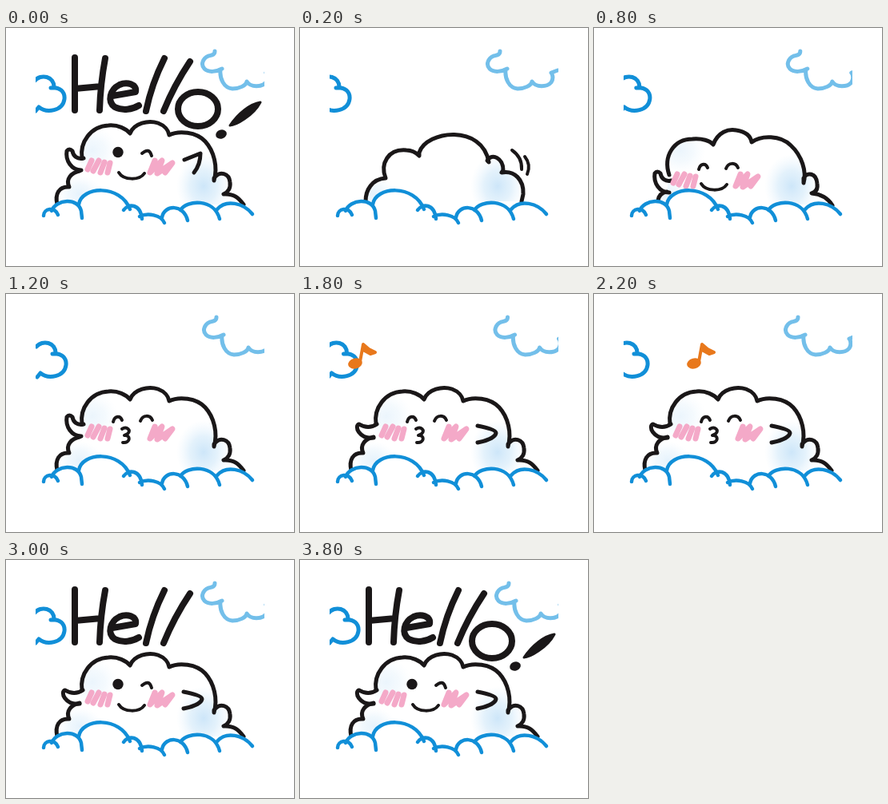
These frames come from a looping animation (360 by 298 pixels, 4 s). An HTML page:

```html
<!DOCTYPE html>
<html lang="en">
<head>
<meta charset="utf-8">
<title>Hello cloud</title>
<style>
html, body { margin: 0; width: 100%; height: 100%; overflow: hidden; background: #fff; }
svg { display: block; width: 360px; height: 298px; }
path { fill: none; stroke: #1a1718; stroke-width: 5; stroke-linecap: round; stroke-linejoin: round; }
path.fill { stroke: none; fill: #fff; }
path.thin { stroke-width: 4; }
.cheeks path { stroke: #f4a9c8; stroke-width: 7; }
.blue path { stroke: #118fd8; }
#front path { fill: #fff; stroke-width: 4.5; }
#sky path { stroke: #73bfea; }
#word path { stroke-width: 8; }
#word .solid { fill: #1a1718; stroke-width: 3; }
#note { fill: #e8781c; }
#note path { stroke: #e8781c; stroke-width: 4; fill: #e8781c; }
</style>
</head>
<body>
<svg viewBox="0 0 360 298" role="img" aria-label="Hello!">
  <defs>
    <clipPath id="frame"><rect x="37" y="26" width="286" height="224"/></clipPath>
    <clipPath id="inside"><path id="bodyClip"/></clipPath>
    <radialGradient id="shade">
      <stop offset="0" stop-color="#cde6f9"/>
      <stop offset=".5" stop-color="#d8ecfa" stop-opacity=".7"/>
      <stop offset="1" stop-color="#e8f4fd" stop-opacity="0"/>
    </radialGradient>
  </defs>

  <g clip-path="url(#frame)">
    <g id="left" class="blue"><path d="M25 66C32 57 50 60 49 75M45 75C56 73 63 80 62 89C60 104 40 107 30 99L26 104"/></g>
    <g id="sky"><path d="M250 29C250 34 246 34 242 35C235 38 232 46 237 51C242 56 252 55 259 51M257 53C256 63 261 75 272 76C281 76 289 72 290 67C295 75 309 74 314 68C317 64 316 58 314 56L322 53"/></g>
  </g>

  <g id="body">
    <path id="bodyFill" class="fill"/>
    <g clip-path="url(#inside)" fill="url(#shade)">
      <ellipse cx="247" cy="198" rx="34" ry="40"/>
      <ellipse id="sideShade" cx="108" cy="153" rx="32" ry="30" opacity=".4"/>
      <ellipse cx="92" cy="208" rx="28" ry="24" opacity=".5"/>
    </g>
    <path id="outline"/>
    <g id="ticks"><path class="thin" d="M265 153Q278 162 277 177M281 161Q289 171 284 183"/></g>
    <path id="ear"/>
    <path id="arm"/>
    <g id="face">
      <g class="cheeks"><path d="M107 166L102 177M116 166L109 179M123 168L118 181M130 169L127 181M186 166L180 181L195 166L189 182L208 169L199 181"/></g>
      <g id="happyEyes"><path class="thin" d="M134 160C136 152 143 152 145 158M168 159C171 151 180 151 183 158"/></g>
      <g id="winkEyes"><circle cx="140" cy="155.5" r="6.7" fill="#1a1718"/><path class="thin" d="M170 157Q179 149 182 160"/></g>
      <path id="smile" class="thin" d="M141 181C147 191 167 191 173 182"/>
      <path id="pucker" class="thin" d="M145 169C151 165 157 171 152 175L148 177C156 176 156 187 146 186"/>
    </g>
  </g>

  <g id="front" class="blue"><path d="M47 235C47 226 61 223 65 234M57 229C63 214 90 212 94 229L95 238M91 221C94 198 143 195 155 227M147 228C153 219 168 220 170 239M167 236C177 231 194 234 198 244M195 237C198 221 222 220 227 241M218 228C226 215 260 213 267 239M264 227C275 214 297 219 308 233"/></g>

  <g id="note">
    <ellipse cx="125" cy="87" rx="9" ry="6.5" transform="rotate(-15 125 87)"/>
    <path d="M131 85L135 63L142 69L150 73L144 75L135 70"/>
  </g>

  <g id="word">
    <path d="M86 37V103M124 38Q118 70 117 103M86 76L119 73"/>
    <path d="M133 85L162 80C164 70 151 67 142 71C130 77 126 92 136 99C146 104 158 102 166 97"/>
    <path d="M198 38Q182 70 175 104"/>
    <path d="M230 42Q210 72 197 104"/>
    <ellipse cx="240" cy="101.5" rx="25" ry="21.5" fill="none" stroke="#1a1718" stroke-width="8"/>
    <g><path class="solid" d="M318 93C305 95 290 107 280 122C287 122 309 110 318 93Z"/><ellipse cx="269" cy="133" rx="7" ry="5.5" transform="rotate(-20 269 133)" fill="#1a1718"/></g>
  </g>
</svg>
<script>
const el = id => document.getElementById(id);
const STEP = 200, STEPS = 20;

// "|" marks a gap in the line that the fill bridges
const bodies = {
  hidden: "M82 217C82 203 90 189 107 188C100 170 110 151 133 153C140 153 145 156 149 160L149 156C158 128 228 120 236 168L234 166C240 156 254 163 254 178L252 181C268 178 280 190 279 208L277 217",
  peek: "M80 216C81 209 85 206 91 205|94 184C86 160 100 139 123 139C135 138 145 141 149 146C155 130 168 126 178 128C190 130 196 136 197 143C209 134 233 134 246 147C260 160 266 180 262 194L262 188C266 180 278 181 279 195C280 203 276 206 272 207C285 208 293 214 298 222",
  full: "M64 221C61 208 66 198 79 199C74 189 82 181 92 179|95 163C92 143 106 123 128 122C140 121 150 126 155 132C160 119 178 115 190 119C198 122 203 128 204 134C216 128 238 130 249 142C260 154 265 174 260 191L260 188C267 178 279 182 280 193C281 201 277 206 272 208C285 207 291 213 297 221"
};
const ears = {
  up: "M97 163C89 165 84 160 83 154Q79 150 76 154C74 166 82 178 94 178",
  down: "M96 163C90 167 82 168 74 163C67 165 74 182 92 180"
};
const arms = {
  up: "M223 165L243 157Q243 171 235 181",
  down: "M222 165C232 167 245 170 245 174C244 180 232 184 222 186"
};

// sideways drift of the far clouds: [step, offset]
const drift = [[1, 0], [6, 13], [7, 14], [11, 5], [15, 11], [20, 11]];
function driftAt(step) {
  if (step < 1) return 11;
  const k = drift.findIndex(p => p[0] > step);
  const [s0, x0] = drift[k - 1], [s1, x1] = drift[k];
  return x0 + (x1 - x0) * (step - s0) / (s1 - s0);
}

const show = (id, on) => el(id).style.display = on ? "" : "none";
const move = (id, x, y) => el(id).setAttribute("transform", `translate(${x} ${y})`);
const setPath = (id, d) => el(id).setAttribute("d", d);

function draw(step) {
  const hidden = step >= 1 && step <= 3;
  const peek = step === 4;
  const whistle = step >= 5 && step <= 14;
  const greet = !hidden && !peek && !whistle;
  const side = step % 2 ? "down" : "up";

  const d = bodies[hidden ? "hidden" : peek ? "peek" : "full"];
  setPath("bodyFill", d.replace("|", "L"));
  setPath("bodyClip", d.replace("|", "L"));
  setPath("outline", d.replace("|", "M"));
  const squash = step === 7 || step === 14 ? 0.98 : step === 3 ? 1.05 : 1;
  el("body").setAttribute("transform", `translate(0 ${222 * (1 - squash)}) scale(1 ${squash})`);
  show("sideShade", !hidden);
  show("ticks", step === 1 || step === 2);

  show("ear", !hidden);
  setPath("ear", ears[peek ? "up" : side]);
  move("ear", 0, peek ? 28 : 0);
  show("arm", step >= 9 || step === 0);
  setPath("arm", arms[side]);

  show("face", !hidden);
  move("face", peek ? -3 : 0, peek ? 17 : 0);
  show("happyEyes", !greet);
  show("winkEyes", greet);
  show("smile", !whistle);
  move("smile", peek ? -4 : 0, peek ? -3 : 0);
  show("pucker", whistle);

  const x = driftAt(step);
  move("left", x, 0);
  move("sky", x, 0);
  move("front", 0, step === 5 ? 5 : 0);

  // each note floats left for four steps
  const n = (step - 7) % 4;
  show("note", step >= 7 && step <= 14);
  move("note", -28 * n, n % 2 ? -8 : 0);

  const letters = step === 0 ? 6 : Math.max(0, (step - 13) * 2);
  [...el("word").children].forEach((c, i) => c.style.display = i < letters ? "" : "none");
}

const start = performance.now();
let last = -1;
function tick() {
  const step = Math.floor((performance.now() - start) / STEP) % STEPS;
  if (step !== last) draw(last = step);
  requestAnimationFrame(tick);
}
tick();
</script>
</body>
</html>
```
